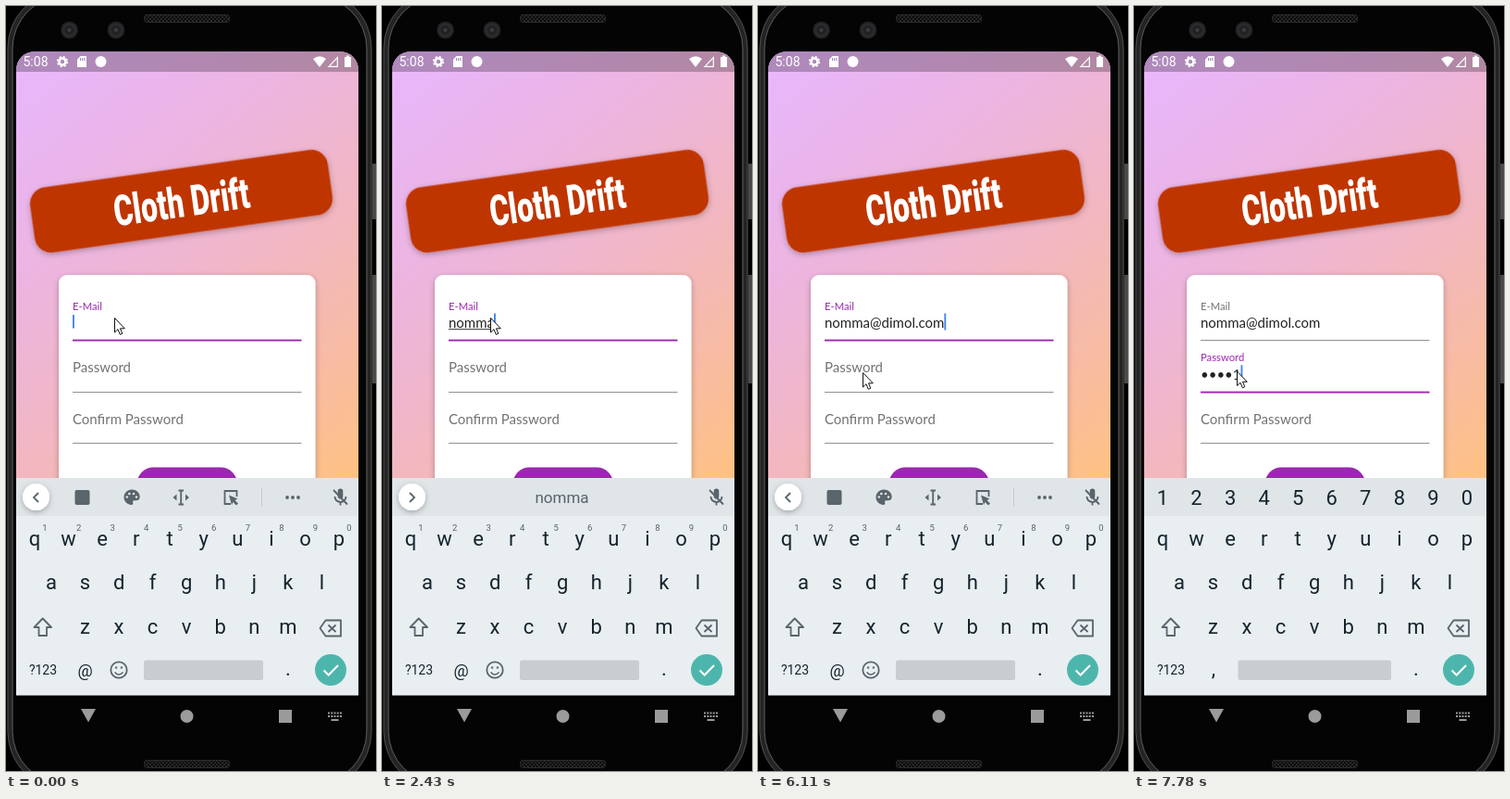
An HTML page that plays this animation: 400x825 px, repeating every 8 s.

```html
<!DOCTYPE html>
<html lang="en">
<head>
<meta charset="utf-8">
<title>Sign-up form</title>
<style>
  html, body { margin: 0; width: 100%; height: 100%; overflow: hidden; background: #000; }
  svg { display: block; width: 100%; height: 100%; }
  text { white-space: pre; }
  .form { font-family: Lato, sans-serif; font-size: 15px; fill: #222; }
  .hint { fill: #737373; }
  .small { font-size: 11.25px; }
  .keys { font: 22px Roboto, sans-serif; fill: #14242c; text-anchor: middle; }
  .keys .sup { font-size: 9.5px; fill: #56626a; }
  .icon { fill: none; stroke: #59646b; stroke-width: 1.8; }
  .solid { fill: #59646b; }
  .title { font: 900 46px Roboto, sans-serif; fill: #fff; text-anchor: middle; }
</style>
</head>
<body>
<svg viewBox="0 0 400 825" xmlns="http://www.w3.org/2000/svg">
  <defs>
    <linearGradient id="sky" gradientUnits="userSpaceOnUse" x1="11" y1="49" x2="381" y2="509">
      <stop offset="0" stop-color="rgb(215,117,255)" stop-opacity=".5"/>
      <stop offset="1" stop-color="rgb(255,188,117)" stop-opacity=".9"/>
    </linearGradient>
    <pattern id="mesh" width="4" height="4" patternUnits="userSpaceOnUse">
      <rect width="4" height="4" fill="#262626"/>
      <path d="M0 0L4 4M4 0L0 4" stroke="#0c0c0c"/>
    </pattern>
    <radialGradient id="lens">
      <stop offset="0" stop-color="#4a4a4e"/>
      <stop offset=".35" stop-color="#1d1d20"/>
      <stop offset=".7" stop-color="#2e2e31"/>
      <stop offset="1" stop-color="#18181a"/>
    </radialGradient>
    <filter id="soft" x="-20%" y="-30%" width="140%" height="160%">
      <feDropShadow dx="0" dy="2" stdDeviation="3" flood-opacity=".28"/>
    </filter>
    <clipPath id="screen"><path d="M11 509V69a20 20 0 0 1 20-20H361a20 20 0 0 1 20 20V509Z"/></clipPath>
  </defs>

  <!-- phone body -->
  <rect width="400" height="825" fill="#000"/>
  <path d="M398 170V230M398 290V407" stroke="#4a4a4a" stroke-width="4"/>
  <g fill="none">
    <rect x="4.5" y="-14" width="388" height="856" rx="60" fill="#040404" stroke="#242424" stroke-width="6"/>
    <rect x="2" y="-16.500" width="393" height="861" rx="62" stroke="#4c4c4c"/>
    <rect x="7" y="-11" width="383" height="850" rx="57" stroke="#5a5a5a"/>
  </g>
  <g fill="url(#mesh)" stroke="#2c2c2c">
    <rect x="149.500" y="9.500" width="92" height="8" rx="3"/>
    <rect x="149.500" y="813.500" width="92" height="8" rx="3"/>
  </g>
  <circle cx="68.500" cy="26" r="9.500" fill="url(#lens)"/>
  <circle cx="119" cy="26" r="9.500" fill="url(#lens)"/>

  <!-- app -->
  <g clip-path="url(#screen)">
    <rect x="11" y="49" width="370" height="460" fill="#fafafa"/>
    <rect x="11" y="49" width="370" height="460" fill="url(#sky)"/>
    <g transform="translate(189.5 210.5) rotate(-8)">
      <rect x="-162.500" y="-35.500" width="325" height="71" rx="18" fill="#bf3600" filter="url(#soft)"/>
      <text class="title" y="17" transform="scale(.69 1)">Cloth Drift</text>
    </g>
    <rect x="57" y="290" width="277.500" height="290" rx="9" fill="#fff" filter="url(#soft)"/>
    <rect x="141.500" y="497.500" width="108.500" height="45" rx="18" fill="#9c27b0"/>
    <rect x="11" y="49" width="370" height="22" fill="#000" opacity=".25"/>
  </g>

  <!-- status bar -->
  <g fill="#fff">
    <text x="18.500" y="65" font-family="Roboto, sans-serif" font-size="14">5:08</text>
    <g fill="none" stroke="#fff">
      <circle cx="61" cy="60" r="3.500" stroke-width="2.600"/>
      <circle cx="61" cy="60" r="5.200" stroke-width="1.800" stroke-dasharray="2.2 1.884"/>
      <path d="M349 65.300H358.300V55.500Z" stroke-width="1.200"/>
    </g>
    <path d="M80.500 54H87V66H77V57.500Z"/>
    <path d="M80.500 56V59M82.500 56V59M84.500 56V59" stroke="#a687b5"/>
    <circle cx="102.500" cy="60" r="6"/>
    <path d="M332 57Q339 51.500 346 57L339 66Z"/>
    <path d="M366 55H368V53.500H371V55H373V66H366Z"/>
  </g>

  <!-- form -->
  <g class="form">
    <text id="mailLabel" class="small" x="72" y="328">E-Mail</text>
    <text id="mail" x="72" y="346.500"></text>
    <text id="passLabel" x="72" y="394.500">Password</text>
    <text id="pass" x="72" y="402.500"></text>
    <text class="hint" x="72" y="450.500">Confirm Password</text>
    <rect id="mailLine" x="72" width="247.500"/>
    <rect id="passLine" x="72" width="247.500"/>
    <rect x="72" y="471" width="247.500" height="1" fill="#919191"/>
    <rect id="under" x="72" y="348" height="1" fill="#444"/>
    <rect id="caret" width="1.900" fill="#4285f4"/>
  </g>

  <!-- keyboard -->
  <rect x="11" y="509" width="370" height="234.500" fill="#e9eef1"/>
  <rect x="11" y="509" width="370" height="41" fill="#e0e5e8"/>
  <g id="strip">
    <circle cx="32.500" cy="529.500" r="14.500" fill="#fff" filter="url(#soft)"/>
    <path id="chevron" class="icon" stroke-width="2"/>
    <g id="tools">
      <rect class="solid" x="74.500" y="522" width="16" height="16" rx="2"/>
      <path class="solid" d="M136 521.500c-5 0-8.500 3.700-8.500 8.300s3.700 8.200 8.300 8.200c1.500 0 2-1.300 1.400-2.400s.1-2.300 1.500-2.300h2.200c2.300 0 3.800-1.600 3.800-4 0-4.600-4-7.800-8.700-7.800z"/>
      <g fill="#e0e5e8">
        <circle cx="130.800" cy="529.500" r="1.300"/><circle cx="133.300" cy="526" r="1.300"/>
        <circle cx="138" cy="526" r="1.300"/><circle cx="141" cy="529.500" r="1.300"/>
      </g>
      <path class="icon" d="M186.500 522.500H192M186.500 537.500H192M189.200 522.500V537.500"/>
      <path class="solid" d="M184.500 526.500V533.500L180.500 530ZM194 526.500V533.500L198 530Z"/>
      <path class="icon" d="M243 537H236.500V523H249.500V529"/>
      <path class="solid" d="M241 527.500L250.500 531.500L247.500 533L251 536.500L249 538.500L245.500 535L244 538Z"/>
      <path d="M276.500 519V540" stroke="#c3c9cd"/>
      <g class="solid">
        <circle cx="304" cy="530" r="1.900"/><circle cx="310" cy="530" r="1.900"/><circle cx="316" cy="530" r="1.900"/>
      </g>
    </g>
    <text id="guess" x="194.500" y="536" text-anchor="middle" font-family="Roboto, sans-serif" font-size="17" fill="#56626a"></text>
    <rect class="solid" x="358.700" y="520.500" width="5.600" height="11" rx="2.800"/>
    <path class="icon" stroke-width="1.600" d="M355.500 529a6 6 0 0 0 12 0M361.500 535V538.500M354 522L369 537.500"/>
  </g>
  <g id="keys" class="keys"></g>
  <g class="icon" stroke-linejoin="round">
    <path d="M39.700 660.500L49 670H44V679H35.500V670H30.500Z"/>
    <path d="M345.500 662.500H362V679.500H345.500L339.500 671Z"/>
    <path d="M348.500 667.500L356.500 675M356.500 667.500L348.500 675"/>
  </g>
  <g id="smile" class="icon">
    <circle cx="122" cy="716" r="8.700"/>
    <path d="M117.500 718.500Q122 723.500 126.500 718.500" stroke-width="1.600"/>
    <path d="M118 713.500H120.200M123.800 713.500H126" stroke-width="2.200"/>
  </g>
  <rect id="space" y="705.500" height="21.500" rx="2.500" fill="#c8cdd1"/>
  <circle cx="351" cy="716" r="17" fill="#4db6ac"/>
  <path d="M343.500 716.500L348.700 721.500L359 711" fill="none" stroke="#fff" stroke-width="2"/>

  <!-- navigation -->
  <g fill="#9b9b9b">
    <path d="M81 758H97L89 772.500Z"/>
    <circle cx="195.500" cy="766" r="7"/>
    <rect x="295" y="759" width="14" height="14"/>
    <path d="M348 762.500H363M348 766H363" stroke="#9b9b9b" stroke-width="2" stroke-dasharray="2 1.250"/>
    <path d="M351.500 770H359.500" stroke="#9b9b9b" stroke-width="2"/>
  </g>

  <path id="mouse" d="M.5 .5V16L4 12.700L6.300 18.300L8.800 17.200L6.500 11.800H11.300Z" fill="#fff" stroke="#111"/>
</svg>

<script>
const LOOP = 8000;
const $ = id => document.getElementById(id);
const set = (id, attrs) => {
  for (const k in attrs) $(id).setAttribute(k, attrs[k]);
};
const show = (id, on) => set(id, { visibility: on ? 'visible' : 'hidden' });

// Keyboard letters
const GAP = 36.55;
const key = (ch, x, y, extra = '') => `<text x="${x}" y="${y}" ${extra}>${ch}</text>`;
const row = (chars, x, y, extra) => [...chars].map((c, i) => key(c, x + i * GAP, y, extra)).join('');
$('keys').innerHTML =
  row('qwertyuiop', 31, 582) + row('asdfghjkl', 49, 629) + row('zxcvbnm', 85.5, 677) +
  key('?123', 40, 721, 'font-size="14"') + key('.', 305, 722) +
  `<g id="mailKeys">${row('1234567890', 42, 566, 'class="sup"')}${key('@', 85.5, 723, 'font-size="18"')}</g>` +
  `<g id="passKeys">${row('1234567890', 31, 538)}${key(',', 86, 722)}</g>`;

// Each step changes part of the state
const USER = 'nomma', HOST = 'dimol';
const steps = [
  [0, { mail: '', pass: '', guess: '', caret: 1, focus: 'mail', lift: 0, digits: 0, mouse: [117, 336] }],
  [280, { caret: 0 }]
];
const at = (t, change) => steps.push([t, change]);
[710, 850, 990, 1130].forEach((t, i) => {
  const word = USER.slice(0, i + 1);
  at(t, { mail: word, guess: word, caret: 1 });
});
at(1380, { mail: USER });
at(1530, { guess: USER });
at(1960, { caret: 0 });
at(2430, { caret: 1 });
at(2860, { caret: 0 });
at(3510, { mail: USER + '@', guess: '', caret: 1 });
[3820, 3960, 4100, 4250, 4390].forEach((t, i) => at(t, { mail: USER + '@' + HOST.slice(0, i + 1) }));
['.', '.co', '.com'].forEach((end, i) => at(4670 + 150 * i, { mail: USER + '@' + HOST + end }));
at(5590, { caret: 0 });
at(5870, { mouse: [116, 352] });
at(5990, { mouse: [113, 386] });
at(6110, { mouse: [113, 395], caret: 1 });
at(6230, { focus: 'pass', lift: 0.1, caret: 0 });
at(6380, { lift: 0.79, digits: 1, caret: 1 });
at(6530, { lift: 1, mouse: [111, 393.5] });
at(6810, { caret: 0 });
[7080, 7200, 7320, 7630, 7780].forEach((t, i) => at(t, { pass: '•'.repeat(i) + '1', caret: 1 }));

function line(id, y, on) {
  set(id, on ? { y: y - 0.9, height: 1.9, fill: '#9c27b0' } : { y: y - 0.5, height: 1, fill: '#919191' });
}

function draw(s) {
  const onMail = s.focus === 'mail';
  const tint = on => on ? '#9c27b0' : '#737373';
  $('mail').textContent = s.mail;
  $('pass').textContent = s.pass;
  $('guess').textContent = s.guess;
  set('mailLabel', { fill: tint(onMail) });
  set('passLabel', { fill: tint(!onMail), y: 394.5 - 11.3 * s.lift });
  $('passLabel').style.fontSize = 15 - 3.75 * s.lift + 'px';
  line('mailLine', 360.5, onMail);
  line('passLine', 416.5, !onMail);

  const width = s[s.focus] ? $(s.focus).getComputedTextLength() : 0;
  const top = onMail ? 331.5 : 387.3;
  set('caret', { x: 72 + width, y: width ? top : top + 1.5, height: width ? 18 : 14.5 });
  show('caret', s.caret);
  set('under', { width: s.guess ? width : 0 });

  show('strip', !s.digits);
  $('tools').style.display = s.guess ? 'none' : '';
  set('chevron', { d: s.guess ? 'M30 525L35 530L30 535' : 'M35 525L30 530L35 535' });
  show('mailKeys', !s.digits);
  show('passKeys', s.digits);
  show('smile', !s.digits);
  const left = s.digits ? 112.5 : 149;
  set('space', { x: left, width: 278 - left });
  set('mouse', { transform: `translate(${s.mouse})` });
}

const start = performance.now();
let last = -1;
function tick() {
  const t = (performance.now() - start) % LOOP;
  const past = steps.filter(step => step[0] <= t);
  if (past.length !== last) {
    last = past.length;
    draw(Object.assign({}, ...past.map(step => step[1])));
  }
  requestAnimationFrame(tick);
}
tick();
</script>
</body>
</html>
```
